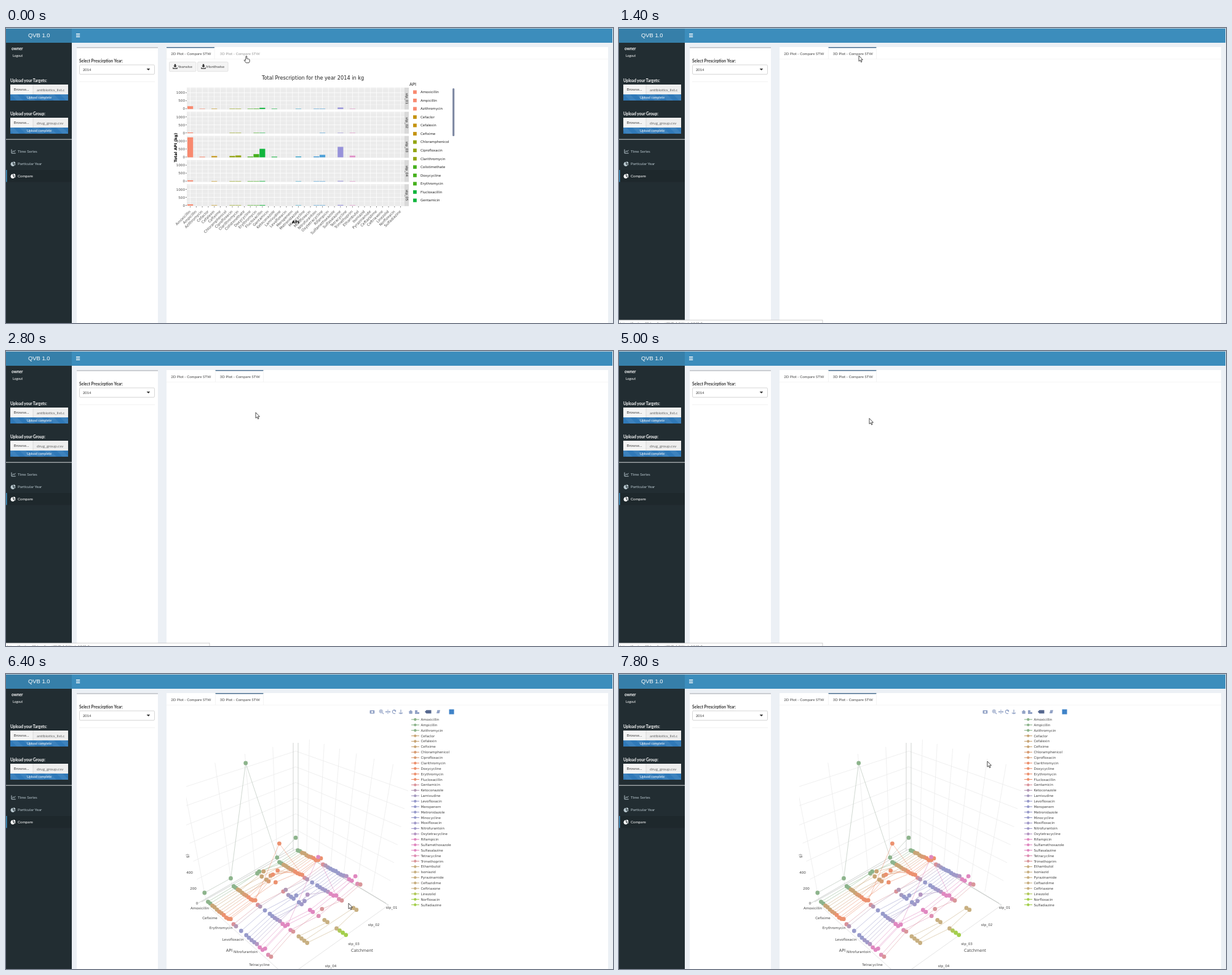
An HTML page for the animation above (8 s loop, 987 by 480 pixels).

```html
<!DOCTYPE html>
<html lang="en">
<head>
<meta charset="utf-8">
<title>Prescription dashboard</title>
<style>
html, body { margin: 0; width: 100%; height: 100%; overflow: hidden; background: #ecf0f5; }
svg { display: block; width: 987px; height: 480px; font: 6.25px Lato, sans-serif; }
.b { font-weight: bold; }
.p { font-family: "DejaVu Sans", Verdana, sans-serif; }
</style>
</head>
<body>
<svg id="stage" viewBox="0 0 987 480" xmlns="http://www.w3.org/2000/svg"></svg>
<script>
const rect = (x, y, w, h, fill, more = '') =>
  `<rect x="${x}" y="${y}" width="${w}" height="${h}" fill="${fill}" ${more}/>`;
const path = (d, stroke, width = 1, fill = 'none', more = '') =>
  `<path d="${d}" stroke="${stroke}" stroke-width="${width}" fill="${fill}" ${more}/>`;
const dot = (x, y, r, fill) => `<circle cx="${x}" cy="${y}" r="${r}" fill="${fill}"/>`;
const text = (x, y, s, fill, size = 6.25, cls = '', more = '') =>
  `<text x="${x}" y="${y}" fill="${fill}" font-size="${size}" class="${cls}" ${more}>${s}</text>`;
const group = (id, body) => `<g id="${id}">${body}</g>`;
const range = n => [...Array(n).keys()];
const END = 'text-anchor="end"', MID = 'text-anchor="middle"';

const drugs = ('Amoxicillin Ampicillin Azithromycin Cefaclor Cefalexin Cefixime Chloramphenicol Ciprofloxacin ' +
  'Clarithromycin Colistimethate Doxycycline Erythromycin Flucloxacillin Gentamicin Ketoconazole Lamivudine ' +
  'Levofloxacin Meropenem Metronidazole Minocycline Moxifloxacin Nitrofurantoin Oxytetracycline Rifampicin ' +
  'Sulfamethoxazole Sulfasalazine Tetracycline Trimethoprim Ethambutol Isoniazid Pyrazinamide Ceftazidime ' +
  'Ceftriaxone Linezolid Norfloxacin Sulfadiazine').split(' ');
// Prescribed amounts in the largest catchment, in bar pixels
const amount = { Amoxicillin: 32.5, Azithromycin: 1, Cefalexin: 2, Ciprofloxacin: 2.2, Clarithromycin: 3,
  Doxycycline: 1.2, Erythromycin: 5.2, Flucloxacillin: 13.8, Ketoconazole: 1, Metronidazole: 1.5,
  Nitrofurantoin: 1.5, Oxytetracycline: 4, Sulfasalazine: 17, Trimethoprim: 2.7 };
const share = [.14, .035, 1, .06, .065];

function frame() {
  const upload = (y, label, file) =>
    text(7, y, label, '#fff', 6.55, 'b') +
    rect(7, y + 4, 94, 16, '#eee') + rect(7, y + 4, 37, 16, '#f4f4f4') +
    path(`M44 ${y + 4}v16`, '#ccc', .6) +
    text(12.5, y + 14.1, 'Browse...', '#444') + text(50, y + 14.6, file, '#666', 6.5) +
    rect(7, y + 20, 94, 10, 'url(#stripe)') +
    text(54, y + 27.2, 'Upload complete', '#fff', 5.4, '', MID);
  const pie = (y, c) => path(`M11.2 ${y - 3}v3.5l2.6 2.5a3.6 3.6 0 1 1 -2.6 -6z`, 'none', 0, c) +
    path(`M12.2 ${y - 3.6}a3.4 3.4 0 0 1 3.3 3.4h-3.3zM12.5 ${y + .6}h3a3.4 3.4 0 0 1 -1 2.2z`, 'none', 0, c);
  return `<defs><pattern id="stripe" width="20" height="20" patternUnits="userSpaceOnUse">
    <rect width="20" height="20" fill="#3079b8"/><path d="M0 0h10l10 10v10zM0 10v10h10z" fill="#3d82bd"/></pattern></defs>` +
    rect(0, 0, 987, 480, '#ecf0f5') + rect(0, 0, 986, 24, '#3c8dbc') + rect(0, 0, 107, 24, '#367fa9') +
    rect(0, 0, 987, 1, '#c3cfd8') + rect(0, 24, 107, 456, '#222d32') +
    text(36, 15.2, 'QVB 1.0', '#fff', 9.4, '', 'font-family="Liberation Sans, Arial, sans-serif"') +
    path('M114 9.7h6.2M114 12h6.2M114 14.3h6.2', '#fff', 1.2) +
    text(9, 36.2, 'owner', '#fff', 6.5, 'b') + text(11, 46.7, 'Logout', '#fff', 5.3) +
    upload(88, 'Upload your Targets:', 'antibiotics_list.c') +
    upload(142, 'Upload your Group:', 'drug_group.csv') +
    path('M0 181.2h107', '#d5d8da', 1) +
    rect(0, 231, 107, 19.5, '#1e282c') + rect(0, 231, 1.6, 19.5, '#3c8dbc') +
    path('M9 197.5v6.3h6.7M10.3 201.7l1.7-1.8 1.4 1.3 2-2.4', '#b8c7ce', 1) +
    pie(220.8, '#b8c7ce') + pie(240.6, '#fff') +
    text(19, 203.2, 'Time Series', '#b8c7ce') + text(19, 223, 'Particular Year', '#b8c7ce') +
    text(19, 243, 'Compare', '#fff') +
    rect(115, 31, 132, 449, '#fff') + rect(115, 31, 132, 1.8, '#c6c9ce') +
    text(119, 55.5, 'Select Prescirption Year:', '#333', 6.6, 'b') +
    rect(119.5, 60, 122, 15.3, '#fff', 'rx="1.5" stroke="#ccc" stroke-width=".8"') +
    text(125, 69.8, '2014', '#333', 5.7) + path('M228.7 66h5.6l-2.8 3z', 'none', 0, '#333') +
    path('M119 87.3h123', '#eee', .8) +
    rect(261, 31, 718, 449, '#fff') + path('M261 50.6h718', '#f1f1f1', .8);
}

const tabs = active => [[261, '2D'], [340.5, '3D']].map(([x, name], i) => {
  const mark = i === active
    ? rect(x, 31, 78, 1.5, '#4a6f90') + path(`M${x + 78} 32v18.5M${x} 32v18.5`, '#f1f1f1', .8)
    : '';
  return mark + text(x + 7.3, 44, name + ' Plot - Compare STW', i > active ? '#999' : '#444', 6.12);
}).join('');

function barChart() {
  const hues = ['#f8896f', '#c4930f', '#93a512', '#45b01c', '#10b53c', '#1fb88f', '#3fa8cc', '#4a9fd8', '#9792da', '#e08fc8'];
  const hue = i => hues[Math.min(9, Math.floor(i / 3))];
  const at = i => 299.6 + i * 9.77;
  const button = (x, w, s) => rect(x, 55.3, w, 15.4, '#f4f4f4', 'rx="1.5" stroke="#ddd" stroke-width=".8"') +
    path(`M${x + 8.3} 58.7h2.4v2.7h1.7l-2.9 2.9l-2.9-2.9h1.7z`, 'none', 0, '#333') +
    path(`M${x + 6.3} 64.3v1.6h6.4v-1.6`, '#333', 1.2) + text(x + 14, 65.2, s, '#444', 6);
  let s = button(265.5, 43.5, 'Yearwise') + button(311.5, 49.5, 'Monthwise') +
    text(499, 83.7, 'Total Prescription for the year 2014 in kg', '#222', 8.16, 'p', MID);
  share.forEach((k, row) => {
    const top = 97 + row * 39.3, zero = top + 34.3;
    s += rect(294, top, 354, 35.6, '#ebebeb') + rect(648, top, 7, 35.6, '#d9d9d9');
    [6.5, 13, 19.5, 26, 32.5].forEach((h, n) => s += path(`M294 ${zero - h}h354`, '#fff', n % 2 ? .8 : .4));
    s += path(drugs.map((d, i) => `M${at(i)} ${top}v35.6`).join(''), '#fff', .7);
    [0, 500, 1000].forEach(v => {
      const y = zero - v * .026;
      s += path(`M292 ${y}h2`, '#555', .7) + text(291, y + 2.1, v, '#4d4d4d', 5.6, 'p', END);
    });
    drugs.forEach((d, i) => {
      if (!amount[d]) return;
      const h = Math.min(33, amount[d] * k);
      if (h > .07) s += rect(at(i) - 4.6, zero + .5 - Math.max(.6, h), 9.2, Math.max(.6, h), hue(i));
    });
    s += text(0, 0, 'stp_0' + (row + 1), '#222', 5.4, 'p', MID + ` transform="translate(649.6 ${top + 18}) rotate(90)"`);
  });
  drugs.forEach((d, i) => s += path(`M${at(i)} 290v2`, '#555', .7) +
    text(0, 0, d, '#4d4d4d', 5.9, 'p', END + ` transform="translate(${at(i) + 1} 299) rotate(-45)"`));
  s += text(471, 317.7, 'API', '#000', 6.3, 'p b', MID) +
    text(0, 0, 'Total API (kg)', '#000', 6.3, 'p b', MID + ' transform="translate(278 194.5) rotate(-90)"') +
    text(656, 94, 'API', '#222', 7, 'p');
  drugs.slice(0, 14).forEach((d, i) => {
    const y = 104.2 + i * 13.55;
    s += rect(662, y - 2.8, 5.8, 5.8, hue(i)) + text(674, y + 1.9, d, '#222', 5.5, 'p');
  });
  return s + rect(726, 98, 3.2, 78, '#808ba4', 'rx="1.6"');
}

function scatter() {
  const names = drugs.filter(d => d !== 'Colistimethate');
  const hues = '8db48c*3 c8a576*3 d89d74*2 ec916f*4 d9929a*1 b398b4*1 a59abf*1 989bcb*4 a099c8*2 b396c2*1 e088c0*3 de8fb4*1 d9969a*1 c8b082*5 b0c85a*1 a3cf4c*2'
    .split(' ').flatMap(p => Array(+p.slice(7)).fill('#' + p.slice(0, 6)));
  // Ground start and end of each catchment row
  const rows = [[471, 285, 576, 344], [441, 304, 546, 369], [405, 322, 513, 397], [367, 343, 467, 420], [325, 367.5, 431, 461]];
  const rare = [[], [30, 31], [27, 28, 31, 32, 33, 34], [28, 29, 30, 31], []];
  const lift = (x, y, h) => [x + (x - 470) * h * .00133, y - h];
  const place = (row, i, h = 0) => {
    const [x0, y0, x1, y1] = rows[row], u = i / 26, f = u * (.85 + .15 * u);
    return lift(x0 + (x1 - x0) * f, y0 + (y1 - y0) * f, h);
  };
  const line = pts => 'M' + pts.map(p => p.map(v => v.toFixed(1)).join(' ')).join('L');
  const near = (x, y, h) => lift(x, y, h * (1 + Math.abs(x - 471) * .001));
  const left = [318, 371], back = [471, 285], right = [618, 373];
  let walls = range(6).map(n => line([left, back, right].map(([x, y]) => near(x, y, 32 + n * 25.5)))).join('');
  rows.slice(1).forEach(([x, y]) => walls += line([[x, y], near(x, y, 180)]));
  range(6).forEach(n => { const p = place(0, 5 + n * 5); walls += line([p, near(...p, 185)]); });
  let s = `<clipPath id="view"><path d="M293 57H655V480H293z"/></clipPath><g clip-path="url(#view)">` +
    path(walls, '#ebebeb', .8) +
    path(line([left, back, right]) + 'M467 112V287M475 112V290M312 373L467 283M475 288L622 376', '#c4c8c6', .8) +
    path('M622 376L448 500M331 380L470 505', '#ddd', .8);
  let dots = '';
  names.forEach((d, i) => {
    const pts = [];
    rows.forEach((r, row) => {
      const sparse = row !== 0 && row !== 2 && (i === 14 || i === 16);
      if (i > 26 ? !rare[row].includes(i) : sparse) return;
      const depth = Math.min(1, .75 + row * .125);
      pts.push(place(row, i, (amount[d] || 0) * 5.45 * share[row] * depth));
    });
    if (!pts.length) return;
    s += path(line(pts), i ? hues[i] : '#a5b5a8', .75, 'none', 'opacity=".7"');
    dots += pts.map(([x, y]) => dot(x.toFixed(1), y.toFixed(1), 3.4, hues[i])).join('');
  });
  s += dots + '</g>';
  const label = (x, y, t, size = 5.6) => s += text(x, y, t, '#444', size, 'p', MID);
  label(298.5, 324.5, 400); label(304.5, 350.8, 200); label(310.5, 375, 0);
  [[315, 382.5], [331.5, 399], [349.5, 415], [369, 434], [389.5, 454], [412, 474.5]]
    .forEach(([x, y], n) => label(x, y, names[n * 5]));
  [[627, 382], [598, 410], [565.5, 441], [528, 477]].forEach(([x, y], n) => label(x, y, 'stp_0' + (n + 1)));
  label(363, 452, 'API', 6.6); label(579, 452, 'Catchment', 6.5);
  s += text(0, 0, 'g)', '#444', 6.2, 'p', MID + ' transform="translate(297 296) rotate(-90)"');
  names.forEach((d, i) => {
    const y = 74 + i * 8.868;
    s += path(`M659 ${y}h13`, hues[i], 1.1) + dot(665.3, y, 2.2, hues[i]) + text(674.5, y + 2, d, '#444', 5.5, 'p');
  });
  const ink = '#93a3c6';
  return s + rect(591.5, 59, 7.8, 5.6, ink, 'rx="1"') + dot(595.4, 61.8, 1.5, '#fff') +
    path('M612 63l2 2M608.2 60.7h3.2M609.8 59v3.4', ink, 1.1) + `<circle cx="609.8" cy="60.7" r="2.6" fill="none" stroke="${ink}"/>` +
    path('M617.5 61.5h7M621 58v7M618.7 60l-1.5 1.5 1.5 1.5M623.3 60l1.5 1.5-1.5 1.5', ink, 1) +
    path('M634 60a3 3 0 1 0 -1 4M631 58.5l3 3M642 58v6M639 63q3 3 6 0', ink, 1.2) +
    path('M654.5 61.8l3.6-3.4 3.6 3.4h-1v3h-5.2v-3z', 'none', 0, ink) +
    path('M665 59h4v3h3v3h-7z', 'none', 0, ink) +
    path('M681 61.5l2.5-2.8h8v5.6h-8z', 'none', 0, '#56688f') +
    path('M700 64l1.4-5.3h4.6l-1.4 5.3z', 'none', 0, ink) +
    rect(720.5, 57.5, 8, 8, '#3f83c8');
}

const arrow = path('M0 0V9.2L2.1 7.3L3.6 10.6L5 10L3.6 6.8H6.4Z', '#222', .8, '#fff');
const hand = path('M0 1q1-1 1.7 0v4q3 0 4.4 1.4v3l-1.2 2.3h-4.6l-3.2-4.2q.6-1.4 2.4.3z', '#222', .8, '#fff');

document.getElementById('stage').innerHTML = frame() +
  group('tab2d', tabs(0)) + group('tab3d', tabs(1)) +
  group('bars', barChart()) + group('scatter', scatter()) +
  group('status', rect(-1, 475.2, 332, 8, '#fff', 'id="bubble" stroke="#c5c5c5" stroke-width=".8"') +
    text(2, 483, '', '#666', 5.9, '', 'id="link" font-family="Open Sans, sans-serif"')) +
  group('cursor', group('hand', hand) + group('arrow', arrow));

const el = id => document.getElementById(id);
const show = (id, on) => el(id).setAttribute('display', on ? 'inline' : 'none');

// Pointer tip: time, x, y
const trail = [[0, 390, 45], [1400, 390, 45], [2000, 405, 89], [2400, 405, 89], [2600, 405, 94], [2800, 406, 100],
  [4800, 406, 100], [5000, 407, 109.5], [5400, 407, 109.5], [6000, 540, 300], [6400, 557, 373], [6800, 440, 455],
  [7000, 320, 430], [7200, 443, 404], [7400, 520, 300], [7600, 684, 62], [7800, 599, 142], [8000, 599, 142]];

function pointer(t) {
  const n = trail.findIndex(p => p[0] > t), [t0, x0, y0] = trail[n - 1], [t1, x1, y1] = trail[n];
  const f = (t - t0) / (t1 - t0);
  return [x0 + (x1 - x0) * f, y0 + (y1 - y0) * f];
}

const link = 'https://kxdapp05.localhost/QVB_1.0/';
function draw(now) {
  const t = Math.floor(now % 8000 / 200) * 200;
  const clicked = t >= 1400, loaded = t >= 5400;
  show('tab2d', !clicked); show('bars', !clicked); show('hand', !clicked);
  show('tab3d', clicked); show('arrow', clicked); show('scatter', loaded);
  show('status', t >= 200 && !loaded);
  el('bubble').setAttribute('width', t >= 600 && t < 1200 ? 567 : 332);
  el('link').textContent = link + (clicked ? '#tab-1045-2' : '?w=1075_5#tab-1045-2');
  el('cursor').setAttribute('transform', `translate(${pointer(t)})`);
  requestAnimationFrame(draw);
}
draw(0);
</script>
</body>
</html>
```
